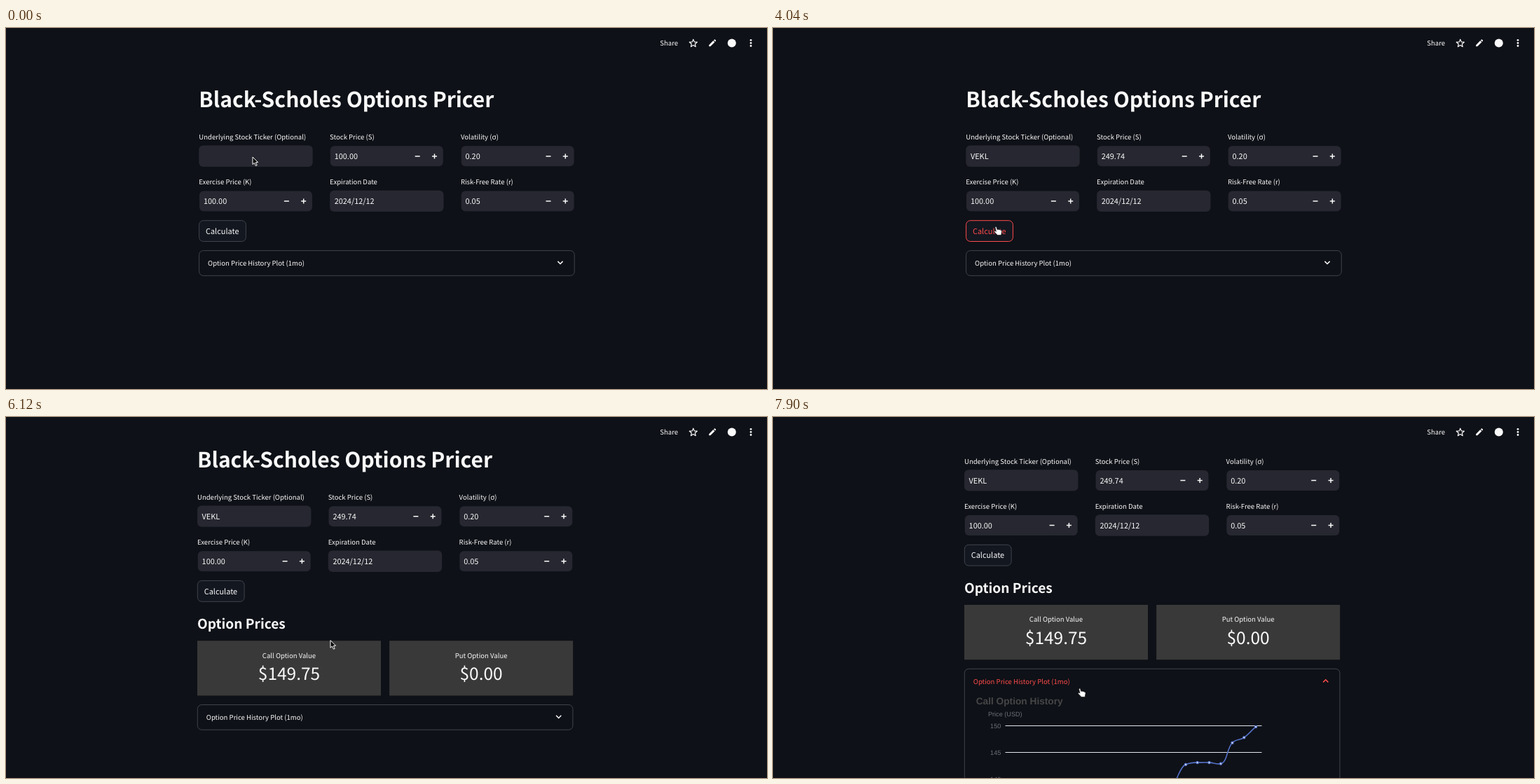
Recreate the animation shown at these times as an HTML page. Size 1086 by 515 pixels, loop 8000 ms.

```html
<!DOCTYPE html>
<html lang="en">
<head>
<meta charset="utf-8">
<title>Black-Scholes Options Pricer</title>
<style>
  html, body { margin: 0; width: 100%; height: 100%; overflow: hidden; background: #0e1117; }
  svg { display: block; width: 100%; height: 100%; text-rendering: geometricPrecision; }
  text { font-family: "Noto Sans CJK JP", "Noto Sans CJK SC", "Noto Sans CJK", sans-serif; fill: #fafafa; white-space: pre; }
  .label { font-size: 9.55px; }
  .value { font-size: 10.92px; }
  .greek { font-family: "Noto Sans", sans-serif; font-size: 10px; }
  .chart text { font-family: "Liberation Sans", Arial, sans-serif; font-size: 9.14px; fill: #6e7079; }
  .line { fill: none; stroke: #fafafa; stroke-width: 1.5; }
</style>
</head>
<body>
<svg id="stage" viewBox="0 0 1086 515" xmlns="http://www.w3.org/2000/svg"></svg>
<script>
const LOOP = 8000;
const RED = '#ff4b4b', EDGE = '#41444c', WHITE = '#fafafa', FIELD = '#262730';
const COLS = [275.3, 462.1, 648.9];
const TICKER = 'VEKL';
const TYPED_AT = [770, 910, 1360, 1660];

const text = (x, y, str, cls = 'label', attrs = '') =>
  `<text x="${x}" y="${y}" class="${cls}" ${attrs}>${str}</text>`;
const rect = (x, y, w, h, attrs) =>
  `<rect x="${x}" y="${y}" width="${w}" height="${h}" ${attrs}/>`;

function field(col, y, label, value, { id = '', number = false } = {}) {
  const x = COLS[col], inset = number ? 0.7 : 0, mid = y + 15.3;
  let out = text(x, y - 8.6, label) +
    rect(x + inset, y + inset, 162.4 - 2 * inset, 30.4 - 2 * inset, `rx="6" fill="${FIELD}" ${id && `id="${id}Box"`}`) +
    text(x + 6.6, y + 19.5, value, 'value', id && `id="${id}"`);
  if (number) {
    out += `<path class="line" d="M${x + 121.6} ${mid}h7M${x + 145.9} ${mid}h7m-3.5-3.5v7"/>`;
  }
  return out;
}

function card(x, label, value) {
  const mid = x + 131;
  return rect(x, 360.4, 262, 78.2, 'fill="#393939"') +
    text(mid, 384.8, label, 'label', 'text-anchor="middle"') +
    text(mid, 416.5, value, '', 'text-anchor="middle" font-size="24.5"');
}

function star(cx, cy, r) {
  return Array.from({ length: 10 }, (_, i) => {
    const a = i * Math.PI / 5 - Math.PI / 2, d = i % 2 ? r * 0.45 : r;
    return `${(cx + d * Math.cos(a)).toFixed(2)},${(cy + d * Math.sin(a)).toFixed(2)}`;
  }).join(' ');
}

const toolbar =
  text(933.3, 25, 'Share') +
  `<polygon class="line" style="stroke-width:1.2" stroke-linejoin="round" points="${star(980.8, 22, 5.8)}"/>` +
  `<path transform="translate(1008 21.5)" fill="${WHITE}" d="M-4.8 4.8V2.7L1.3-3.4 3.4-1.3-2.7 4.8ZM2-4.1l.8-.8q.6-.5 1.1 0l1 1q.5.5 0 1.1l-.8.8Z"/>` +
  `<circle cx="1035.8" cy="21.5" r="6" fill="${WHITE}"/>` +
  [-4.1, 0, 4.1].map(d => `<circle cx="1063" cy="${21.4 + d}" r="1.4" fill="${WHITE}"/>`).join('');

const form =
  text(275.3, 113.4, 'Black-Scholes Options Pricer', '', 'font-size="30" font-weight="700"') +
  field(0, 167.6, 'Underlying Stock Ticker (Optional)', '', { id: 'ticker' }) +
  `<path id="caret" stroke="${WHITE}" stroke-width="1"/>` +
  text(431.8, 194.3, 'Press Enter to apply', '', 'id="hint" text-anchor="end" font-size="8.18" style="fill:#9c9da1"') +
  field(1, 167.6, 'Stock Price (S)', '100.00', { id: 'stock', number: true }) +
  field(2, 167.6, 'Volatility (<tspan class="greek">σ</tspan>)', '0.20', { number: true }) +
  field(0, 231.7, 'Exercise Price (K)', '100.00', { number: true }) +
  field(1, 231.7, 'Expiration Date', '2024/12/12') +
  field(2, 231.7, 'Risk-Free Rate (r)', '0.05', { number: true }) +
  rect(275.6, 274.7, 66.8, 29.8, 'id="button" rx="6"') +
  text(285, 293.7, 'Calculate', 'value', 'id="buttonText"');

const results = `<g id="results">` +
  text(275.3, 343, 'Option Prices', '', 'font-size="19.1" font-weight="700"') +
  `<path id="link" transform="translate(409.3 337.6)" class="line" style="stroke:#8b8d92;stroke-width:1.4"
    d="M-1.4-3H-3.6a3 3 0 0 0 0 6H-1.4M1.4-3H3.6a3 3 0 0 1 0 6H1.4M-2.6 0H2.6"/>` +
  card(275.3, 'Call Option Value', '$149.75') +
  card(549.4, 'Put Option Value', '$0.00') + `</g>`;

// Coordinates are relative to the top of the expander.
const prices = [[591.3, 136.5], [607.9, 133.6], [624.8, 133.6], [641.3, 135.3], [657.8, 105.5], [674.6, 98], [691.3, 82.6]];
const chart = `<g id="chart" class="chart">` +
  text(292, 50.3, 'Call Option History', '', 'style="font-size:13.7px;font-weight:700;fill:#464646"') +
  text(333.6, 68.2, 'Price (USD)', '', 'text-anchor="middle"') +
  [150, 145, 140].map((v, i) => {
    const y = 81.2 + 38 * i;
    return text(327.6, y + 3.2, v, '', 'text-anchor="end"') +
      `<path d="M333.8 ${y}h366" stroke="#e0e6f1"/>`;
  }).join('') +
  `<path fill="none" stroke="#5470c6" stroke-width="1.6" d="M574.6 163C580 156 584 139 591.3 136.5C596 134.5 602 133.6 607.9 133.6
    S619 133.4 624.8 133.6S636 136.6 641.3 135.3C651 133 649.5 114 657.8 105.5C662 100.5 669 101.8 674.6 98S685.5 87.5 691.3 82.6"/>` +
  prices.map(([x, y]) => `<circle cx="${x}" cy="${y}" r="1.6" fill="#fff" stroke="#5470c6" stroke-width="1.3"/>`).join('') +
  `</g>`;

const expander = `<g id="expander">` +
  rect(275.6, 0, 535.6, 35.7, `id="panel" rx="6" fill="none" stroke="${EDGE}"`) +
  text(288.1, 21.6, 'Option Price History Plot (1mo)', 'label', 'id="panelText"') +
  `<path id="chevron" class="line" d="M-3.6-1.9L0 1.7 3.6-1.9"/>` + chart + `</g>`;

const cursors =
  `<path id="arrow" fill="#000" stroke="#fff" stroke-linejoin="round" d="M0 0V10.6L2.5 8.4 4.4 12.6 6.2 11.8 4.3 7.7H7.6Z"/>` +
  `<path id="beam" class="line" style="stroke-width:1.2" d="M-3-6Q0-6 0-4.4Q0-6 3-6M-3 6.4Q0 6.4 0 4.8Q0 6.4 3 6.4M0-4.6V5M-1.6 2.2H1.6"/>` +
  `<path id="hand" fill="#fff" stroke="#111" stroke-width=".7" stroke-linejoin="round"
    d="M0 1C0-.6 2-.6 2.2 1L3 4C4.4 3.2 5.3 3.7 5.6 4.3 6.9 3.7 7.7 4.3 8 5 9.6 4.8 9.7 6 9.4 7.5L8.6 12H3.4L-.8 7.6C-2 6-.2 5.2 1.4 6.7Z"/>`;

document.getElementById('stage').innerHTML =
  `<clipPath id="view"><rect y="39" width="1086" height="476"/></clipPath>` +
  `<rect width="1086" height="515" fill="#0e1117"/>` + toolbar +
  `<g clip-path="url(#view)"><g id="page">${form}${results}${expander}</g></g>` + cursors;

const el = {};
document.querySelectorAll('[id]').forEach(node => el[node.id] = node);

const set = (node, attrs) => { for (const k in attrs) node.setAttribute(k, attrs[k]); };
const show = (node, on) => { node.style.display = on ? '' : 'none'; };
const move = (node, x, y) => node.setAttribute('transform', `translate(${x} ${y})`);
const mix = (a, b, k) => a + (b - a) * k;
const smooth = k => k * k * (3 - 2 * k);

// Progress in n held steps: the first lands at `from`, the last at `to`.
const steps = (t, from, to, n) =>
  Math.max(0, Math.min(n, Math.floor((t - from) / (to - from) * (n - 1) + 1.001))) / n;

function pointer(t) {
  if (t < 180) return [352, 184];
  if (t < 5080) {
    const k = smooth(steps(t, 2710, 3590, 7)), j = 1 - k;
    return [j * j * 352.6 + 2 * j * k * 376 + k * k * 317, j * j * 185 + 2 * j * k * 240 + k * k * 283.6];
  }
  if (t < 6700) {
    const k = smooth(steps(t, 5080, 5530, 4));
    return [mix(317, 463, k), mix(283.6, 318.6, k)];
  }
  const k = smooth(steps(t, 6720, 7010, 3));
  return [mix(463, 436.6, k), mix(318.6, 387.4, k)];
}

function scrollTop(t) {
  if (t >= 7900) return 92.4;
  return 74.7 * (1 - Math.pow(1 - steps(t, 5980, 6570, 5), 3.59));
}

function draw(t) {
  const [px, py] = pointer(t);
  const done = t >= 4630, shift = done ? -2.3 : 0;
  move(el.page, shift, -scrollTop(t));

  const focused = t >= 330 && t < 2860;
  const typed = TYPED_AT.filter(at => t >= at).length;
  el.ticker.textContent = TICKER.slice(0, typed);
  set(el.tickerBox, { stroke: focused ? RED : 'none', 'stroke-width': 1 });
  show(el.caret, focused && !(t >= 2110 && t < 2260));
  const caretX = 282.2 + (typed ? el.ticker.getComputedTextLength() : 0);
  set(el.caret, { d: `M${caretX} 175.6V190.6` });
  show(el.hint, typed > 0 && t < 2260);
  el.hint.style.opacity = t < 2110 ? 1 : 0.5;
  el.stock.textContent = t < 2710 ? '100.00' : '249.74';

  const onButton = t < 5900 && px < 342 && py > 274 && py < 305;
  const pressed = t >= 3890 && t < 4040;
  set(el.button, { fill: pressed ? RED : '#131720', stroke: onButton ? RED : EDGE });
  el.buttonText.style.fill = onButton && !pressed ? RED : WHITE;

  show(el.results, done);
  show(el.link, t >= 5530 && t < 6120);

  const onPanel = t >= 7010, open = t >= 7150;
  const tint = onPanel ? RED : WHITE;
  move(el.expander, 0, done ? 451.7 : 317.6);
  set(el.panel, { height: 35.7 + (t >= 7900 ? 400 : 130 * steps(t, 7150, 7450, 3)) });
  el.panelText.style.fill = tint;
  el.chevron.style.stroke = tint;
  set(el.chevron, { transform: `translate(791 17.2) scale(1 ${open ? -1 : 1})` });
  show(el.chart, t >= 7900);

  const kind = onButton || onPanel ? 'hand' : t >= 180 && py < 198 ? 'beam' : 'arrow';
  for (const name of ['arrow', 'beam', 'hand']) show(el[name], name === kind);
  move(el[kind], px, py);
}

const start = performance.now();
function tick() {
  draw((performance.now() - start) % LOOP);
  requestAnimationFrame(tick);
}
tick();
</script>
</body>
</html>
```
